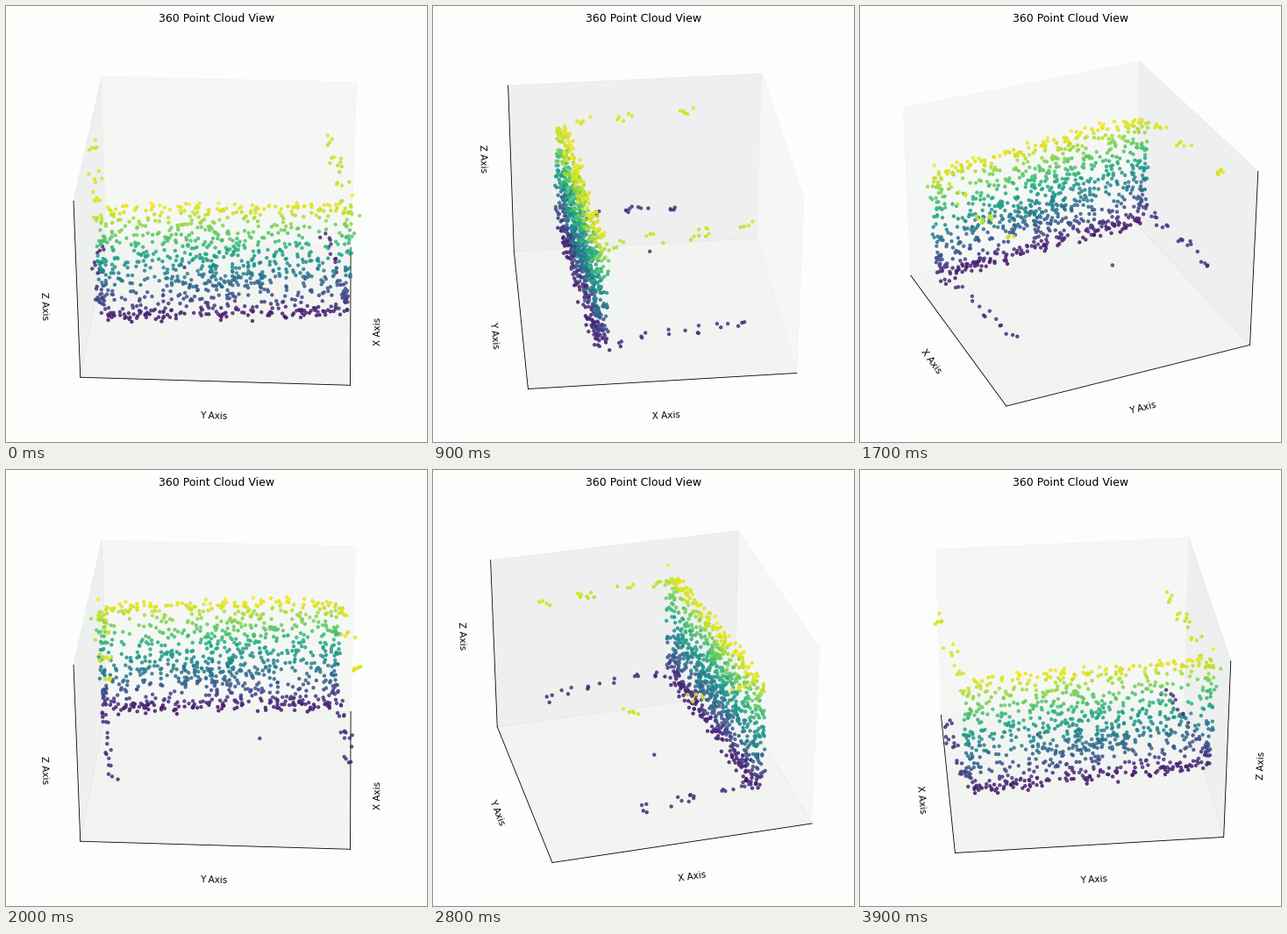
A matplotlib script that plays this animation: 480 by 497 pixels, repeating every 4 s.

```python
import numpy as np
import matplotlib.pyplot as plt
from matplotlib.animation import FuncAnimation

W, H, DPI = 480, 497, 75
FRAMES, INTERVAL = 40, 100
SIDE, MARGIN = 465, 7.5
BACK = "#fcfefb"
HALF, HALF_Z = 0.595, 0.446

rng = np.random.default_rng(8)

# Plan view of the room: one wall from A to B, rails from A to D and B to C.
A, B = np.array([0.365, -0.53]), np.array([0.265, 0.585])
C, D = np.array([-0.40, 0.465]), np.array([-0.30, -0.595])


def strip(start, end, t, z, spread):
    """Points at fractions t of a plan line, scattered sideways."""
    along = (end - start) / np.hypot(*(end - start))
    normal = np.array([-along[1], along[0]])
    side = rng.normal(0, spread, len(t)).clip(-2 * spread, 2 * spread)
    xy = start + np.outer(t, end - start) + np.outer(side, normal)
    return np.column_stack([xy, z])


def wall(t, z):
    return strip(A, B, t, z, 0.018)


def edge_row(height, n):
    return wall(rng.uniform(0, 1, n), rng.normal(height, 0.014, n))


def column(t, n):
    return wall(rng.normal(t, 0.012, n), rng.uniform(-0.28, 0.26, n))


def rail(start, end, height, centers, size):
    """Small clumps of points along a rail."""
    t = np.repeat(centers, size)
    t = (t + rng.normal(0, 0.035, len(t))).clip(0.04, 1)
    return strip(start, end, t, rng.normal(height, 0.011, len(t)), 0.016)


def build_cloud():
    n, m = 700, 60
    return np.vstack([
        wall(rng.uniform(0, 1, n), rng.uniform(-0.29, 0.285, n)),
        edge_row(0.272, m),
        edge_row(-0.265, m),
        wall(rng.normal(0.5, 0.10, m), rng.normal(-0.07, 0.06, m)),
        column(0.015, 40),
        column(0.985, 40),
        rail(A, D, 0.268, [0.15, 0.49, 0.90], 5),
        rail(A, D, -0.235, [0.13, 0.22, 0.47, 0.57, 0.78], 4),
        rail(B, C, 0.247, [0.12, 0.35, 0.60, 0.70, 0.95], 4),
        rail(B, C, -0.245, np.linspace(0.12, 0.95, 6), 3),
        [[-0.022, -0.174, -0.238]],
    ])


def pane(level):
    return (level, level + 0.015, level + 0.005, 0.5)


fig = plt.figure(figsize=((W + 0.01) / DPI, (H + 0.01) / DPI), dpi=DPI,
                 facecolor=BACK)
ax = fig.add_axes([MARGIN / W, MARGIN / H, SIDE / W, SIDE / H],
                  projection="3d", facecolor=BACK)

x, y, z = build_cloud().T
ax.scatter(x, y, z, c=z, cmap="viridis", vmin=-0.32, vmax=0.30,
           s=10, alpha=0.8)

ax.set(xlim=(-HALF, HALF), ylim=(-HALF, HALF), zlim=(-HALF_Z, HALF_Z),
       xticks=[], yticks=[], zticks=[],
       xlabel="X Axis", ylabel="Y Axis", zlabel="Z Axis")
ax.set_title("360 Point Cloud View", pad=6.5)
ax.grid(False)
for axis, level in ((ax.xaxis, 0.93), (ax.yaxis, 0.88), (ax.zaxis, 0.905)):
    axis.set_pane_color(pane(level))


def update(i):
    ax.view_init(elev=30, azim=3 + 360 * i / FRAMES)
    return []


anim = FuncAnimation(fig, update, frames=FRAMES, interval=INTERVAL,
                     repeat=True, repeat_delay=0)
plt.show()
```
